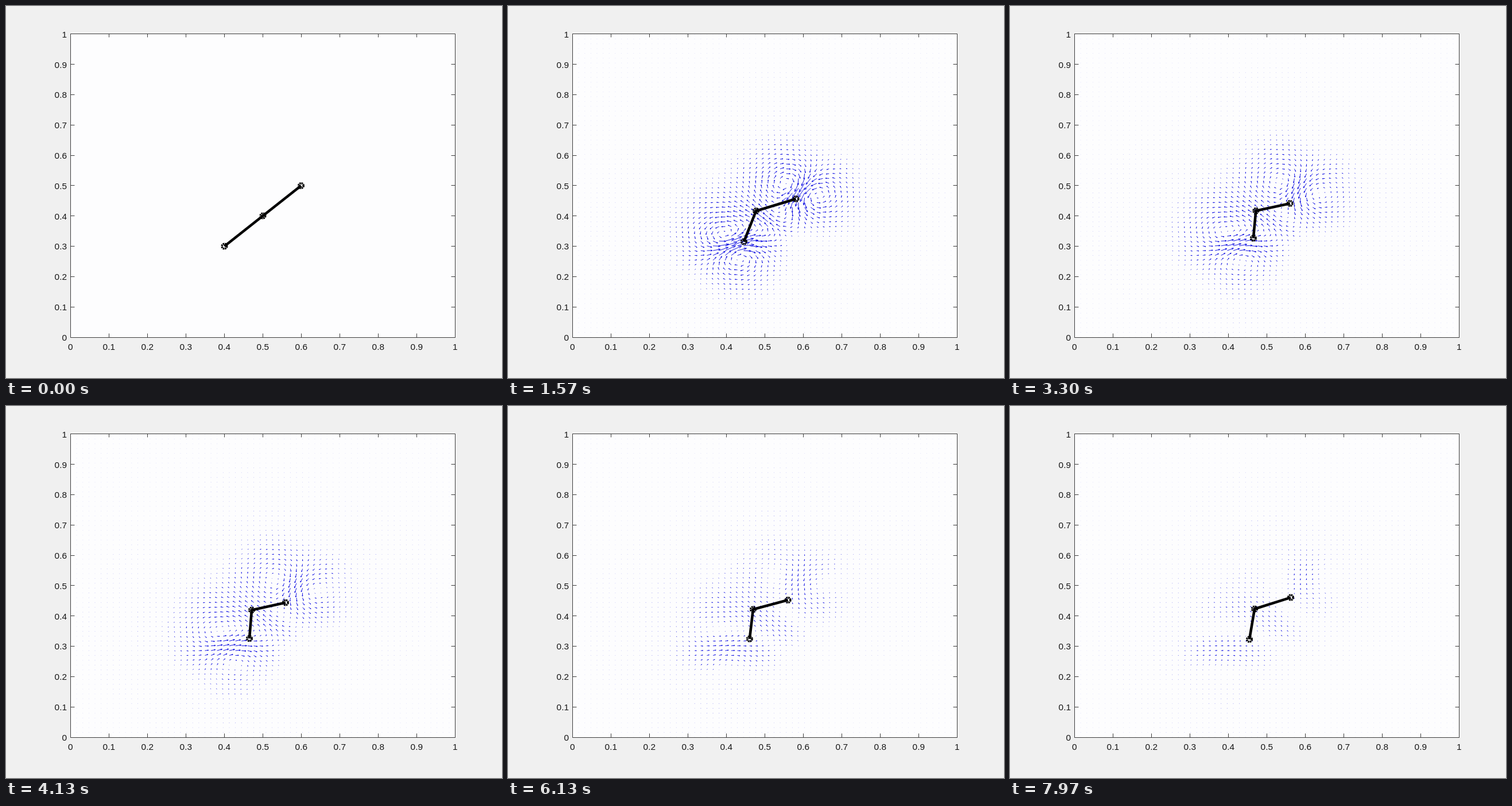
An HTML page that plays this animation: 864x648 px, repeating every 8000 ms.

```html
<!DOCTYPE html>
<html lang="en">
<head>
<meta charset="utf-8">
<title>Three-link swimmer flow</title>
<style>
  html, body { margin: 0; width: 100%; height: 100%; overflow: hidden; background: #f0f0f0; }
  svg { display: block; width: 864px; height: 648px; }
  text { font: 15.4px "Liberation Sans", Arial, sans-serif; fill: #161616; }
  .axis { fill: none; stroke: #3c3c3c; stroke-width: 1; }
  .flow path { fill: none; stroke: #0000e0; stroke-width: .9; }
  .link { fill: none; stroke: #000; stroke-width: 4.6; stroke-linejoin: round; }
  .joint { fill: none; stroke: #000; stroke-width: 3.5; stroke-dasharray: 2.5 .877; }
</style>
</head>
<body>
<svg id="stage" viewBox="0 0 864 648"></svg>
<script>
const LOOP = 8000, FPS = 30, GRID = 63;
const LEFT = 112.5, TOP = 49, WIDTH = 670, HEIGHT = 528;
const px = x => LEFT + x * WIDTH;
const py = y => TOP + (1 - y) * HEIGHT;
const stage = document.getElementById('stage');

function add(tag, attrs, parent = stage) {
  const el = document.createElementNS('http://www.w3.org/2000/svg', tag);
  for (const key in attrs) el.setAttribute(key, attrs[key]);
  return parent.appendChild(el);
}

function label(x, y, anchor, value) {
  add('text', { x, y, 'text-anchor': anchor }).textContent = value;
}

// Axes
add('rect', { x: 112, y: 48, width: 671, height: 530, fill: '#fdfdfe' });
const flow = add('g', { class: 'flow' });
let axis = 'M112.5 48.5H782.5V577.5H112.5Z';
for (let i = 0; i <= 10; i++) {
  const x = Math.floor(px(i / 10)) + .5;
  const y = Math.ceil(py(i / 10)) - .5;
  axis += `M${x} 577.5v-7M${x} 48.5v6`;
  if (i % 10) axis += `M112.5 ${y}h7M782.5 ${y}h-7`;
  label(px(i / 10) - .2, 598.6, 'middle', i / 10);
  label(106, py(i / 10) + 5.7, 'end', i / 10);
}
add('path', { class: 'axis', d: axis });

// Marks are grouped by length so that short ones fade
const LIMITS = [.08, .4, 1, 2, Infinity];
const layers = LIMITS.map((_, i) => add('path', { opacity: .13 + .87 * (i / 4) ** 1.6 }, flow));

const link = add('path', { class: 'link' });
const joints = [0, 1, 2].map(() => add('circle', { class: 'joint', r: 4.3 }));

// Key poses: time in s, then the three joints in px
const POSES = [
  [0,    380.5, 418.5, 447.5, 365.5, 514, 313],
  [.83,  395, 424,     437, 351,     510.5, 329.5],
  [1.57, 411, 410.5,   432, 357,     501.5, 336],
  [2.53, 421.5, 405,   429, 358,     490.5, 343.5],
  [4.13, 424, 405,     428, 355.5,   487, 342.5],
  [8,    417, 406.5,   426, 353.5,   489, 333.5]
];

function slope(i, c) {
  const a = POSES[Math.max(i - 1, 0)], b = POSES[Math.min(i + 1, POSES.length - 1)];
  return (b[c] - a[c]) / (b[0] - a[0]);
}

// Smooth path through the key poses
function poseAt(t) {
  let i = 0;
  while (t > POSES[i + 1][0]) i++;
  const a = POSES[i], b = POSES[i + 1], span = b[0] - a[0];
  const u = (t - a[0]) / span, v = 1 - u;
  return a.map((_, c) =>
    v * v * (1 + 2 * u) * a[c] + u * u * (3 - 2 * u) * b[c] +
    span * u * v * (v * slope(i, c) - u * slope(i + 1, c))).slice(1);
}

// Pushes on the outer side of both ends, balanced by one inside the bend
function forces([x1, y1, x2, y2, x3, y3], t) {
  const off = .07 * (1 - Math.exp(-t / 2.5));
  const turn = .65 - .045 * t;
  const inner = .02 + .6 * off;
  const push = (x, y, dx, dy, fx, fy) => ({
    x: (x - LEFT) / WIDTH + dx, y: 1 - (y - TOP) / HEIGHT + dy, fx, fy
  });
  return [
    push(x1, y1, -off, -.4 * off, 1, turn),
    push(x3, y3, .4 * off, off, -turn, -1),
    push(x2, y2, inner, -inner, turn - 1, 1 - turn)
  ];
}

// Divergence-free jets around each push
function velocity(x, y, list, core2) {
  let u = 0, v = 0;
  for (const f of list) {
    const dx = x - f.x, dy = y - f.y;
    const d = dx * dx + dy * dy + core2;
    const g = (core2 / d) ** 2;
    const swirl = 4 * (f.fx * dy - f.fy * dx) * g / d;
    u += f.fx * g - swirl * dy;
    v += f.fy * g + swirl * dx;
  }
  return [u, v];
}

function mark(x, y, dx, dy, len) {
  if (len < 1.2) return `M${(x - .5).toFixed(1)} ${y.toFixed(1)}h1`;
  const point = (along, side) =>
    `${(x + along * dx + side * dy).toFixed(1)} ${(y + along * dy - side * dx).toFixed(1)}`;
  const tip = point(1, 0);
  return `M${point(0, 0)}L${tip}M${point(.73, .11)}L${tip}L${point(.73, -.11)}`;
}

function drawFlow(pose, t) {
  const paths = LIMITS.map(() => '');
  if (t > 0) {
    const list = forces(pose, t);
    const gain = 34 * Math.exp(-t / 3.5);
    const core2 = .004 + .0018 * t;
    for (let i = 0; i <= GRID; i++) {
      for (let j = 0; j <= GRID; j++) {
        const x = i / GRID, y = j / GRID;
        const [u, v] = velocity(x, y, list, core2);
        const dx = u * gain, dy = -v * gain * HEIGHT / WIDTH;
        const len = Math.hypot(dx, dy);
        paths[LIMITS.findIndex(max => len < max)] += mark(px(x), py(y), dx, dy, len);
      }
    }
  }
  layers.forEach((el, i) => el.setAttribute('d', paths[i]));
}

function draw(t) {
  const pose = poseAt(t);
  drawFlow(pose, t);
  link.setAttribute('d', `M${pose.join(' ')}`);
  joints.forEach((el, i) => {
    el.setAttribute('cx', pose[2 * i]);
    el.setAttribute('cy', pose[2 * i + 1]);
  });
}

let last = -1;
const start = performance.now();
function tick() {
  const t = (performance.now() - start) % LOOP;
  const step = Math.floor((t + 4) * FPS / 1000) % (LOOP * FPS / 1000);
  if (step !== last) draw(step / FPS);
  last = step;
  requestAnimationFrame(tick);
}
tick();
</script>
</body>
</html>
```
